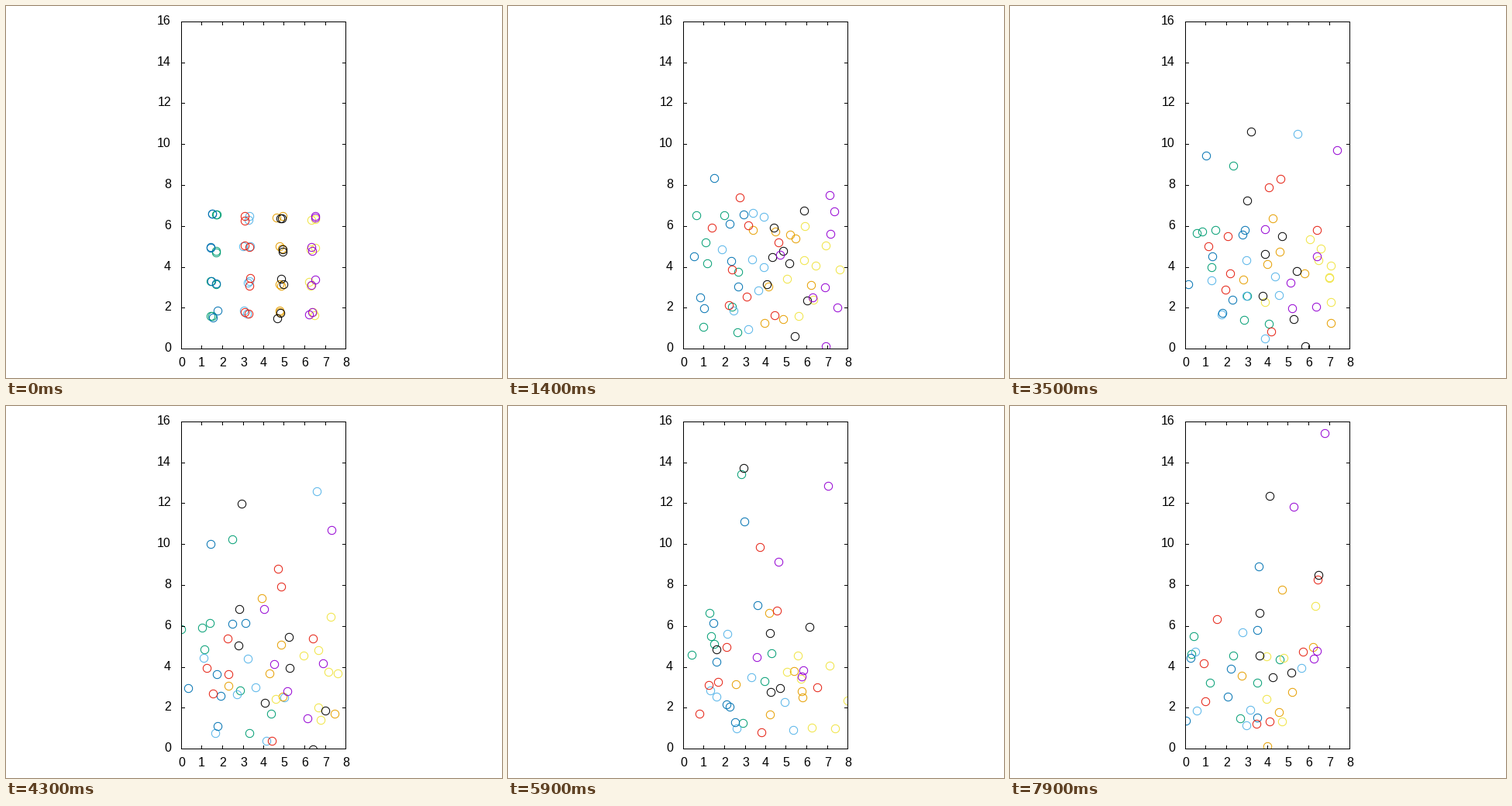
A matplotlib script for the animation above (8 s loop, 640 by 480 pixels).

```python
import numpy as np
import matplotlib.pyplot as plt
from matplotlib.animation import FuncAnimation
from matplotlib.collections import EllipseCollection
from matplotlib.patches import Rectangle

plt.rcParams["font.family"] = "Liberation Sans"

W, H, DPI = 640, 480, 100
FRAMES, STEP = 80, 100
LEFT, RIGHT, TOP, BOTTOM = 226, 438, 19, 441
PX = 72 / DPI
DIAMETER = 10.4
AWAY = -100.0

# Each column of clusters mixes color k with color k + 4.
COLORS = ["#009e73", "#56b4e9", "#e69f00", "#f0e442",
          "#0072b2", "#e51e10", "#000000", "#9400d3"]
CELL = 1.6 * np.array([(RIGHT - LEFT) / 8, (BOTTOM - TOP) / 16])
MIDDLE = np.array([332, 345])
LEGS = 6

# Particles that shoot up, by (color, row, member): points of frame, x, y.
FLYERS = {
    (0, 0, 0): [(0, 271, 269), (14, 279, 270), (35, 288, 206), (79, 314, -23)],
    (1, 0, 1): [(0, 314, 271), (14, 316, 267), (52, 433, 54), (79, 516, -97)],
    (6, 0, 0): [(0, 354, 274), (14, 343, 286), (35, 311, 162), (67, 312, 81),
                (79, 335, 116)],
    (7, 0, 0): [(0, 399, 271), (14, 415, 244), (79, 406, 35)],
    (7, 1, 0): [(0, 394, 311), (14, 351, 321), (79, 366, 130)],
}

rng = np.random.default_rng(12)
spin = rng.uniform(0, 2 * np.pi, (4, 4))


def smooth(t, p):
    """Cubic Hermite curve through points p at times t, one row per frame."""
    t, p = np.asarray(t, float), np.asarray(p, float)
    slope = np.gradient(p, t, axis=0)
    f = np.arange(FRAMES)
    i = np.clip(np.searchsorted(t, f, side="right") - 1, 0, len(t) - 2)
    h = (t[i + 1] - t[i])[:, None]
    s = (f - t[i])[:, None] / h
    return ((1 + 2 * s) * (1 - s) ** 2 * p[i] + s * (1 - s) ** 2 * h * slope[i]
            + s * s * (3 - 2 * s) * p[i + 1] + s * s * (s - 1) * h * slope[i + 1])


def wander(color, row, member):
    """Burst out of the cluster, then drift by random kicks."""
    col = color % 4
    home = np.array([LEFT, BOTTOM]) + CELL * [col + 1, row - 4]
    angle = spin[row, col] + np.pi / 2 * (2 * (color // 4) + member)
    burst = rng.uniform(15, 46) * np.array([np.cos(angle), np.sin(angle)])
    points = [home + rng.uniform(-5, 5, 2)]
    points.append(points[0] + burst)
    for _ in range(LEGS - 1):
        pull = 0.08 * (MIDDLE - points[-1])
        points.append(points[-1] + pull + rng.normal(0, 30, 2))
    return smooth(np.linspace(0, FRAMES - 1, LEGS + 1), points)


def track(key):
    if key in FLYERS:
        points = np.array(FLYERS[key])
        p = smooth(points[:, 0], points[:, 1:])
    else:
        p = wander(*key)
    x, y = p.T
    r = DIAMETER / 2
    outside = (x < LEFT - r) | (x > RIGHT + r) | (y < TOP - r) | (y > BOTTOM + r)
    p[np.logical_or.accumulate(outside)] = AWAY
    return np.floor(p) + 0.5


keys = [(c, row, m) for c in range(8) for row in range(4) for m in range(2)]
motion = np.stack([track(k) for k in keys], axis=1)

fig = plt.figure(figsize=(W / DPI, H / DPI), dpi=DPI, facecolor="white")
ax = fig.add_axes([0, 0, 1, 1])
ax.set(xlim=(0, W), ylim=(H, 0))
ax.axis("off")


def line(xs, ys):
    # Offsets make snapping land on the named pixel column and row.
    ax.plot(np.array(xs) + 0.4, np.array(ys) + 0.6, color="black", lw=PX,
            solid_capstyle="projecting", solid_joinstyle="miter", snap=True,
            zorder=3)


def label(x, y, value, align):
    ax.text(x, y, str(value), size=16 * PX, ha=align, va="baseline")


line([LEFT, RIGHT, RIGHT, LEFT, LEFT], [TOP, TOP, BOTTOM, BOTTOM, TOP])
for n in range(9):
    x = round(LEFT + n * (RIGHT - LEFT) / 8)
    y = round(BOTTOM - n * (BOTTOM - TOP) / 8)
    line([x, x], [BOTTOM, BOTTOM - 4])
    line([x, x], [TOP, TOP + 4])
    line([LEFT, LEFT + 4], [y, y])
    line([RIGHT, RIGHT - 4], [y, y])
    label(x + 0.5, 465, n, "center")
    label(213, y + 5, 2 * n, "right")

sizes = np.full(len(keys), DIAMETER)
rings = EllipseCollection(sizes, sizes, np.zeros(len(keys)), units="xy",
                          offsets=motion[0], offset_transform=ax.transData,
                          facecolors="none", linewidths=PX, zorder=2,
                          edgecolors=[COLORS[k[0]] for k in keys])
ax.add_collection(rings, autolim=False)
rings.set_clip_path(Rectangle((LEFT, BOTTOM + 1), RIGHT - LEFT + 1,
                              TOP - BOTTOM - 1, transform=ax.transData))


def draw(i):
    rings.set_offsets(motion[i])
    return [rings]


anim = FuncAnimation(fig, draw, frames=FRAMES, interval=STEP, repeat=True,
                     repeat_delay=0, blit=False)
plt.show()
```
